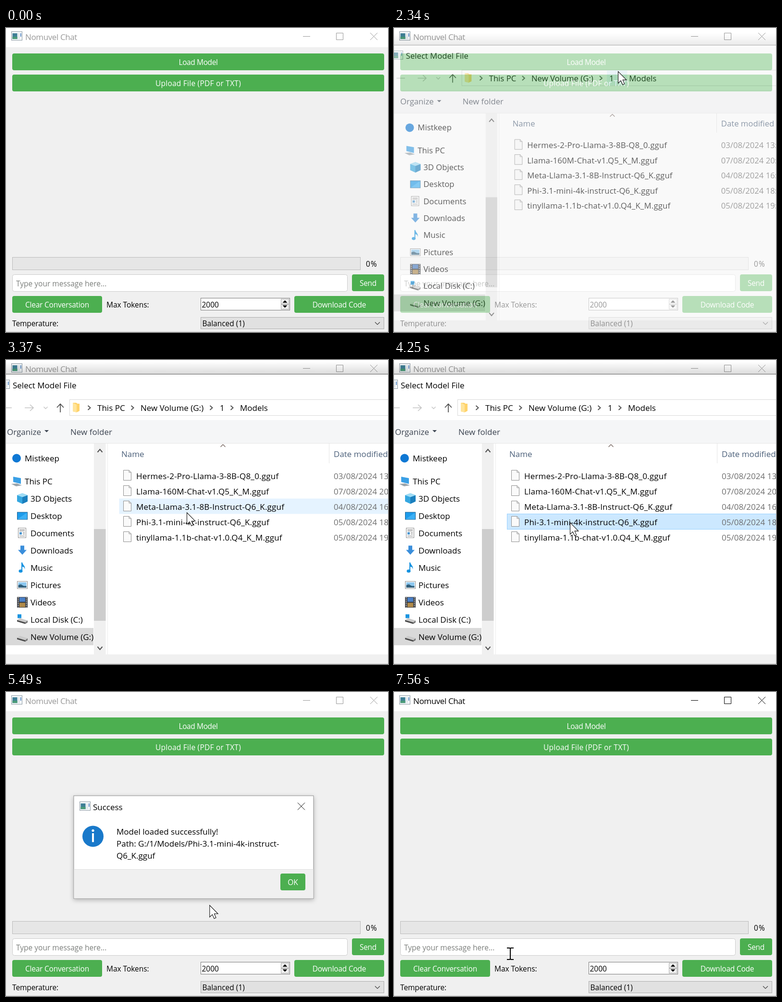
These frames come from a looping animation (795 by 633 pixels, 8 s). An HTML page:

```html
<!DOCTYPE html>
<html lang="en">
<head>
<meta charset="utf-8">
<title>Chat window</title>
<style>
html, body { margin: 0; width: 100%; height: 100%; overflow: hidden; background: #f0f0f0; }
svg { display: block; width: 795px; height: 633px; }
text { font-family: "Open Sans", "Noto Sans", sans-serif; white-space: pre; }
#msg { filter: drop-shadow(0 3px 5px rgba(0, 0, 0, .25)); }
</style>
</head>
<body>
<svg id="stage" viewBox="0 0 795 633" xmlns="http://www.w3.org/2000/svg"></svg>
<script>
const LOOP = 8000, GREEN = '#4caf50', HOVER = '#45a049';

// markup helpers
const rect = (x, y, w, h, fill, more = '') =>
  `<rect x="${x}" y="${y}" width="${w}" height="${h}" fill="${fill}" ${more}/>`;
const line = (d, color, width = 1, more = '') =>
  `<path d="${d}" fill="none" stroke="${color}" stroke-width="${width}" ${more}/>`;
const shape = (d, fill, more = '') => `<path d="${d}" fill="${fill}" ${more}/>`;
const text = (x, y, str, size = 17, fill = '#000', ls = 0, more = '') =>
  `<text x="${x}" y="${y}" font-size="${size}" fill="${fill}" letter-spacing="${ls}" ${more}>${str}</text>`;
const label = (x, y, str, ls = 0, fill = '#000') => text(x, y, str, 15.5, fill, ls);
const at = (x, y, inner) => `<g transform="translate(${x} ${y})">${inner}</g>`;
const button = (id, x, y, w, h, str, ls) =>
  rect(x, y, w, h, GREEN, `rx="4" id="${id}"`) +
  text(x + w / 2, y + h / 2 + 6, str, 15.5, '#fff', ls, 'text-anchor="middle"');
const appIcon = (x, y) => at(x, y,
  rect(.5, .5, 22, 18, '#f4f8fa', 'stroke="#8d9aa3"') +
  rect(2.5, 4, 10, 12, '#3f7f96') + rect(2.5, 11, 10, 5, '#4a9a78') +
  rect(14, 4, 4, 12, '#e3e9ed') + rect(19, 4, 1.6, 7, '#4a7fc0'));

function mainWindow() {
  return rect(0, 0, 795, 633, '#f0f0f0') + rect(0, 0, 795, 40, '#fff') + appIcon(11, 7) +
    `<g id="caption">` +
      text(40, 24.5, 'Nomuvel Chat', 17, 'currentColor', -.4) +
      line('M618 17.5H633M687.5 10.5H701.5V24.5H687.5ZM758 10L773 25M773 10L758 25', 'currentColor') +
    `</g>` +
    button('load', 13, 53, 774, 35, 'Load Model', -.4) +
    button('upload', 13, 97, 774, 35, 'Upload File (PDF or TXT)', .23) +
    rect(13.5, 477.5, 724, 26, '#e6e6e6', 'stroke="#bcbcbc"') + label(749, 497, '0%', 1.2) +
    rect(13.5, 513.5, 697, 35, '#fff', 'rx="4" stroke="#ccc"') +
    label(21, 537.5, 'Type your message here...', 0, '#7c7f7c') +
    line('M21.5 522V541', '#000', 1, 'id="caret"') +
    button('send', 720, 513, 67, 35, 'Send', -.3) +
    button('clear', 13, 558, 187, 35, 'Clear Conversation', -.23) +
    label(209, 581.5, 'Max Tokens:', -.05) +
    rect(405.5, 562.5, 185, 25, '#fff', 'stroke="#7a7a7a"') + label(407.5, 581.5, '2000') +
    rect(572.5, 564.5, 16, 10, '#f0f0f0', 'stroke="#acacac"') +
    rect(572.5, 575.5, 16, 10, '#f0f0f0', 'stroke="#acacac"') +
    shape('M575.5 572L580.5 567L585.5 572ZM575.5 577.5L580.5 582.5L585.5 577.5Z', '#000') +
    button('down', 600, 558, 187, 35, 'Download Code', -.23) +
    label(13, 620.5, 'Temperature:', -.1) +
    rect(405.5, 602.5, 381, 24, '#e1e1e1', 'stroke="#adadad" id="combo"') +
    label(408.5, 620.5, 'Balanced (1)') +
    line('M768 612.5L773 617.5L778 612.5', '#444', 1.2);
}

const drive = shape('M0 9L6 5L22 10L22 14L17 17L0 12Z', '#c9c9c9') +
  shape('M0 9L17 14V17L0 12Z', '#4a4a4a') + shape('M17 14L22 10V14L17 17Z', '#777');
const places = [
  ['3D Objects', shape('M0 4L11 0L22 4V17L11 22L0 17Z', '#35a7e0') + shape('M11 8L22 4V17L11 22Z', '#1b7fbd') +
    shape('M0 4L11 0L22 4L11 8Z', '#9fdcf5')],
  ['Desktop', rect(.5, 3.5, 21, 15, '#1d9bea', 'stroke="#1b5f8f"') + shape('M1 18L21 4V18Z', '#3cb0f5')],
  ['Documents', rect(2.5, .5, 16, 20, '#fff', 'stroke="#8a8a8a"') + rect(5, 9, 5, 5, '#4a95cf') +
    line('M5 4H16M5 6.5H16M12 10H16M12 13H16M5 17H16', '#777')],
  ['Downloads', shape('M7 1H15V10H20L11 20L2 10H7Z', '#3a8edb')],
  ['Music', shape('M9 0H11C12 6 18 7 16 15C16 11 14 9 11 9V18H9Z', '#1592e0') +
    `<ellipse cx="7.5" cy="18" rx="4" ry="3.2" fill="#1592e0"/>`],
  ['Pictures', rect(.5, 3.5, 21, 15, '#fff', 'stroke="#8a8a8a"') + rect(2.5, 5.5, 17, 11, '#8cc7ef') +
    shape('M2.5 11L8 9.5L14 13L19.5 13V16.5H2.5Z', '#33607c')],
  ['Videos', rect(0, 0, 22, 22, '#33363c') + rect(5, 1, 12, 9, '#4a80c8') + rect(5, 12, 12, 9, '#b08a4a') +
    line('M2.5 1V22M19.5 1V22', '#ddd', 2, 'stroke-dasharray="2 2"')],
  ['Local Disk (C:)', rect(1, 0, 8, 8, '#1a94e0') + at(0, 3, drive)],
  ['New Volume (G:)', at(0, 4, drive)]
];
const files = [
  ['Hermes-2-Pro-Llama-3-8B-Q8_0', '03/08/2024 13:20'],
  ['Llama-160M-Chat-v1.Q5_K_M', '07/08/2024 20:15'],
  ['Meta-Llama-3.1-8B-Instruct-Q6_K', '04/08/2024 16:40'],
  ['Phi-3.1-mini-4k-instruct-Q6_K', '05/08/2024 18:05'],
  ['tinyllama-1.1b-chat-v1.0.Q4_K_M', '05/08/2024 19:30']
];

function fileDialog() {
  const crumbs = [173, 263, 427, 470].map(x => `M${x - 2.5} 95L${x + 2.5} 99.5L${x - 2.5} 104`).join('');
  return '<linearGradient id="shade" x2="0" y2="1"><stop stop-opacity="0"/><stop offset="1" stop-opacity=".14"/></linearGradient>' +
    rect(-26, 3, 1282, 26, 'url(#shade)') +
    rect(-26, 29, 1282, 700, '#fff') + line('M-26 29.5H1256', '#5c5c5c') +
    appIcon(-15, 41) + text(14, 58.5, 'Select Model File') +
    line('M12 99.5H-6M39 99.5H57M50 93L57 99.5L50 106', '#c4c4c4', 1.6) +
    line('M78.5 97.5L82.5 101.5L86.5 97.5', '#c4c4c4', 1.4) +
    line('M113 109V92M106 99L113 91.5L120 99', '#4c4c4c', 1.7) +
    rect(132.5, 82.5, 1000, 33, '#fff', 'stroke="#d9d9d9"') +
    shape('M139 89H146L149 91H153V106L147 109L139 107Z', '#ffd36b') + shape('M139 89L147 93V109L139 107Z', '#ffe49b') +
    `<g id="crumb">${rect(440, 83, 43, 32, '#e9f5fd')}${line('M458.5 83V115', '#d4ecfa')}</g>` +
    line(crumbs, '#555', 2) +
    text(190, 106, 'This PC') + text(280, 106, 'New Volume (G:)') + text(445, 106, '1') + text(487, 106, 'Models') +
    rect(-26, 125, 1282, 48, '#f5f6f7') + line('M-26 173.5H1256', '#e6e6e6') +
    text(2, 155.5, 'Organize', 17, '#3b4350') + shape('M80 146H89L84.5 150.5Z', '#3b4350') +
    text(134, 155.5, 'New folder', 17, '#3b4350') +
    // tree
    `<circle cx="22" cy="204.5" r="9" fill="#0f78d4"/>` + text(39, 210.5, 'Mistkeep') +
    at(11, 242, shape('M4 1L20 4V16L4 12Z', '#3aa0e6') + shape('M0 16L12 15L22 19L10 21Z', '#9aa4ab')) +
    text(39, 258.5, 'This PC') +
    rect(-26, 558, 208, 36, '#d9d9d9') +
    places.map(([name, icon], i) => at(23, 277.5 + 36 * i, icon) + text(51, 294.5 + 36 * i, name)).join('') +
    rect(183, 174, 24.5, 439, '#f0f0f0') + rect(183, 352, 24.5, 191, '#cdcdcd') +
    line('M190.5 192L195.5 186L200.5 192M190.5 597L195.5 603L200.5 597', '#505050', 2) +
    line('M211.5 174V613', '#ececec') +
    // list
    rect(214, 174, 458, 41, '#d9ebf9', 'id="head"') +
    line('M672.5 174V215', '#e5e5e5') + line('M446.5 181L451.5 176L456.5 181', '#7a6a64', 1.3) +
    text(240, 202, 'Name', 17, '#4c607a') + text(682, 202, 'Date modified', 17, '#4c607a') +
    rect(235.5, 225, 1000, 32, '#e5f3ff', 'id="row"') +
    files.map(([name, date], i) => {
      const y = 248 + 32 * i;
      return at(244, y - 19, shape('M.5 .5H12L16.5 5V21.5H.5Z', '#fafafa', 'stroke="#8f8f8f"') +
          line('M12 .5V5H16.5', '#8f8f8f')) +
        text(271, y, name + '.gguf', 17, '#000', .19) + text(682, y, date, 17, '#6d6d6d');
    }).join('') +
    rect(-26, 613, 1282, 120, '#f0f0f0');
}

function messageBox() {
  return rect(141, 216, 499, 214, '#fff', 'stroke="#8f8f8f"') +
    rect(141.5, 369.5, 498, 60, '#f0f0f0') + line('M141.5 369.5H639.5', '#dfdfdf') +
    appIcon(153, 228) + text(181, 245.5, 'Success') +
    line('M607 230.5L622 245.5M622 230.5L607 245.5', '#000', 1, 'id="shut"') +
    `<circle cx="181" cy="300.5" r="22" fill="#1979ca"/>` +
    rect(179, 294, 4, 18.5, '#fff') + `<circle cx="181" cy="288.5" r="2.6" fill="#fff"/>` +
    text(230, 296.5, 'Model loaded successfully!') +
    text(230, 321.5, 'Path: G:/1/Models/Phi-3.1-mini-4k-instruct-') +
    text(230, 346.5, 'Q6_K.gguf') +
    button('ok', 571, 378, 52, 35, 'OK', 0);
}

const stage = document.getElementById('stage');
stage.innerHTML = mainWindow() +
  `<g id="dlg">${fileDialog()}</g><g id="msg">${messageBox()}</g>` +
  line('M0 632.5H795', '#d6d6d6') +
  `<g id="arrow">${shape('M.5 .5V25L6.1 19.7L9.9 28L13.7 26.4L10.1 18.1H17.8Z', '#fff', 'stroke="#111" stroke-width="1.1"')}</g>` +
  `<g id="beam">${line('M-7 -12H-2Q0 -12 0 -10Q0 -12 2 -12H7M0 -11V11M-7 12H-2Q0 12 0 10Q0 12 2 12H7', '#000', 2)}</g>`;

const el = {};
stage.querySelectorAll('[id]').forEach(n => el[n.id] = n);

const bursts = [[0, 0], [680, 1450], [1520, 2270], [2340, 2540], [2740, 3510], [3580, 3850], [4180, 4520],
  [4780, 5560], [5630, 6400], [6470, 6750], [6950, 7160]];
const path = [[680, 520, 606], [960, 500, 420], [1240, 470, 210], [1450, 455, 100], [1590, 452, 76],
  [1870, 450, 72], [2200, 458, 80], [2340, 466, 90], [2700, 466, 90], [2880, 430, 165], [2950, 418, 192],
  [3090, 400, 250], [3300, 380, 310], [3510, 368, 332], [3850, 366, 338], [4700, 366, 338],
  [4920, 352, 397], [5060, 352, 462], [5200, 358, 503], [5410, 400, 460], [5560, 450, 425], [5980, 588, 397],
  [6260, 585, 400], [6400, 522, 432], [6470, 460, 460], [6750, 244, 544], [7020, 249, 547], [7160, 242, 545]];
const dlgFade = [[2200, 0], [2340, .6], [2480, .93], [2540, 1], [4250, 1], [4320, .7], [4390, .35], [4460, .1], [4520, 0]];
const msgFade = [[4850, 0], [4920, .15], [5000, .5], [5070, .8], [5200, 1], [6190, 1], [6260, .5], [6330, .15], [6400, 0]];

function step(t) {
  const [a, b] = bursts.filter(s => s[0] <= t).pop();
  return Math.min(b, a + 70 * Math.floor((t - a) / 70));
}

function track(keys, t, k = 1) {
  const i = keys.findIndex(q => q[0] > t);
  if (i < 0) return keys[keys.length - 1][k];
  if (i === 0) return keys[0][k];
  const p = keys[i - 1], q = keys[i];
  return p[k] + (q[k] - p[k]) * (t - p[0]) / (q[0] - p[0]);
}

const show = (node, on) => node.setAttribute('display', on ? 'inline' : 'none');

function fade(node, o, cx, cy) {
  const s = .955 + .045 * o;
  show(node, o > 0);
  node.setAttribute('opacity', o);
  node.setAttribute('transform', `translate(${cx * (1 - s)} ${cy * (1 - s)}) scale(${s})`);
}

function draw(now) {
  const t = step(now), x = track(path, t, 1), y = track(path, t, 2);
  const dlg = track(dlgFade, t), msg = track(msgFade, t);
  const over = (l, u, r, b) => t >= 680 && x >= l && x < r && y >= u && y < b;
  const free = !dlg && !msg;
  const paint = (id, on) => el[id].setAttribute('fill', on ? HOVER : GREEN);

  fade(el.dlg, dlg, 615, 377);
  fade(el.msg, msg, 390.5, 323);

  const active = (t >= 1870 && t < 2200) || (t >= 4320 && t < 4850) || t >= 6190;
  el.caption.setAttribute('color', active ? '#000' : '#999');

  paint('load', free && over(13, 53, 787, 88));
  paint('upload', free && over(13, 97, 787, 132));
  paint('ok', msg === 1 && over(571, 378, 623, 413));
  const combo = free && over(405, 602, 787, 627);
  el.combo.setAttribute('fill', combo ? '#e5f1fb' : '#e1e1e1');
  el.combo.setAttribute('stroke', combo ? '#0078d7' : '#adadad');

  show(el.crumb, t >= 2290 && t < 2950);
  show(el.head, dlg === 1 && over(214, 174, 672, 215));
  const picked = t >= 4180, row = picked ? 3 : Math.floor((y - 225) / 32);
  show(el.row, picked || (dlg === 1 && row >= 0 && row < 5));
  el.row.setAttribute('y', 224.5 + 32 * row);
  el.row.setAttribute('fill', picked ? '#cce8ff' : '#e5f3ff');
  el.row.setAttribute('stroke', picked ? '#99d1ff' : 'none');
  show(el.shut, t < 6190);

  const beam = free && (over(13, 513, 711, 549) || over(405, 562, 571, 588));
  const pos = `translate(${x} ${y})`;
  el.arrow.setAttribute('transform', pos);
  el.beam.setAttribute('transform', pos);
  show(el.arrow, t >= 680 && !beam);
  show(el.beam, beam);
  show(el.caret, now >= 7030 && now < 7560);
}

let start;
function tick(now) {
  if (start === undefined) start = now;
  draw((now - start) % LOOP);
  requestAnimationFrame(tick);
}
draw(0);
requestAnimationFrame(tick);
</script>
</body>
</html>
```
